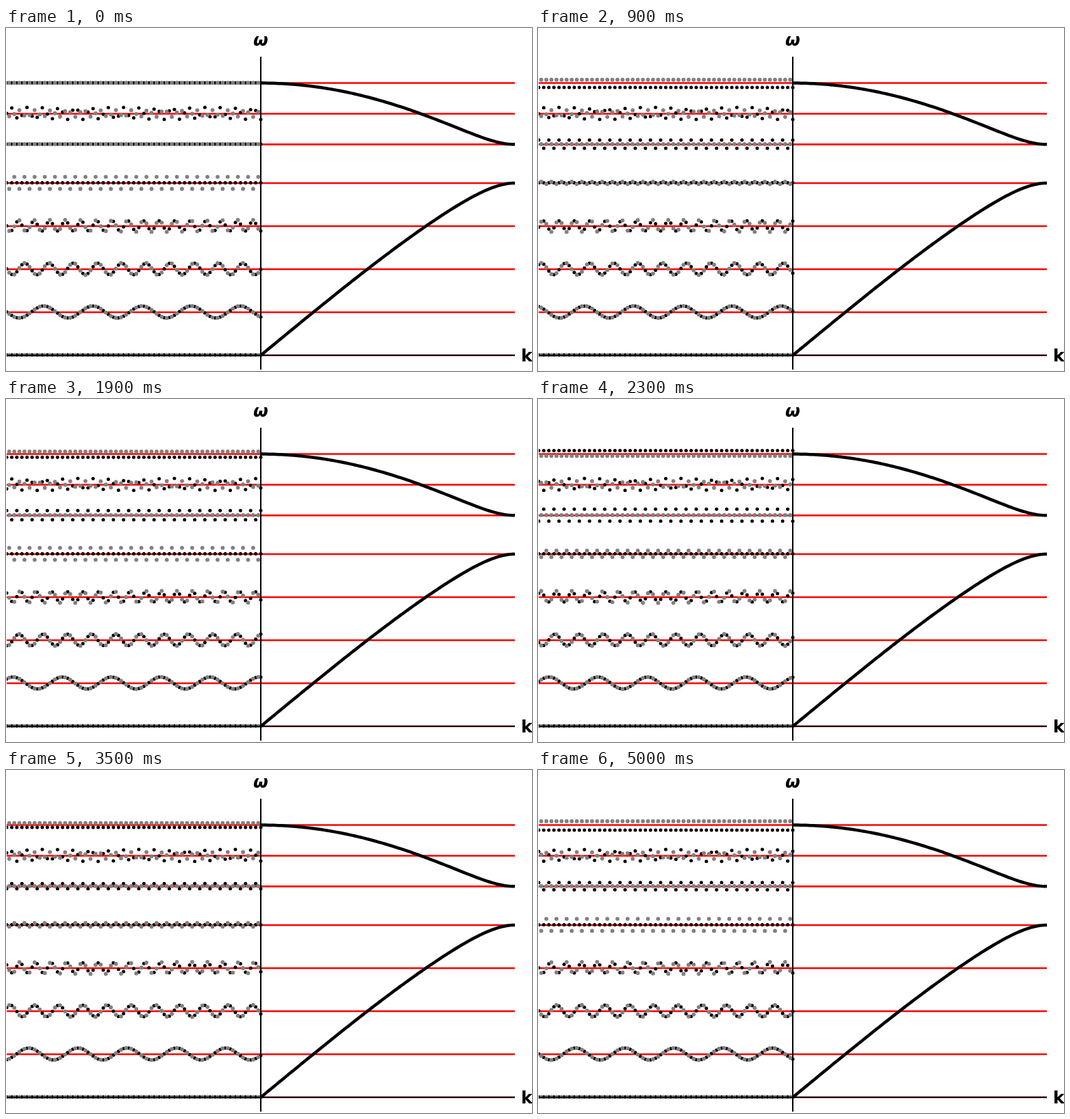
Write an HTML page with a canvas that moves like this. It is 768 px wide and 502 px high and loops after 5100 ms.

```html
<!DOCTYPE html>
<html lang="en">
<head>
<meta charset="utf-8">
<title>Phonon dispersion of a diatomic chain</title>
<style>
  html, body { margin: 0; width: 100%; height: 100%; overflow: hidden; background: #fff; }
  canvas { display: block; }
</style>
</head>
<body>
<canvas id="stage" width="768" height="502"></canvas>
<script>
const ctx = document.getElementById('stage').getContext('2d');
const LEFT = 1, AXIS = 372, RIGHT = 743, BASE = 479, SCALE = 63;
const CELLS = 50, SPACING = (AXIS - LEFT) / CELLS, AMPLITUDE = 8.8;
const STEP = 100, STEPS = 51, PERIOD = 50;

// Squared zone-edge frequencies of the heavy and the light sublattice
const HEAVY = 16, LIGHT = 24, MEAN = (HEAVY + LIGHT) / 2;
const TOP = Math.sqrt(HEAVY + LIGHT), EDGE = Math.sqrt(LIGHT);

const rowY = w => BASE - SCALE * w;

// branch: -1 acoustic, +1 optical; k in radians per cell
function frequency(k, branch) {
  const s = Math.sin(k / 2);
  return Math.sqrt(MEAN + branch * Math.sqrt(MEAN ** 2 - HEAVY * LIGHT * s * s));
}

function makeMode(w, branch) {
  const w2 = w * w;
  const s2 = (MEAN ** 2 - (w2 - MEAN) ** 2) / (HEAVY * LIGHT);
  const k = 2 * Math.asin(Math.sqrt(Math.min(1, Math.max(0, s2))));
  const c = Math.cos(k / 2);
  return branch < 0
    ? { w, k, heavy: AMPLITUDE, light: AMPLITUDE * LIGHT * c / (LIGHT - w2) }
    : { w, k, heavy: AMPLITUDE * HEAVY * c / (w2 - HEAVY), light: -AMPLITUDE };
}

const modes = [
  ...[0, 1, 2, 3, 4].map(w => makeMode(w, -1)),
  ...[EDGE, (EDGE + TOP) / 2, TOP].map(w => makeMode(w, 1))
];

function line(x1, y1, x2, y2, color, width) {
  ctx.strokeStyle = color;
  ctx.lineWidth = width;
  ctx.beginPath();
  ctx.moveTo(x1, y1);
  ctx.lineTo(x2, y2);
  ctx.stroke();
}

function drawAtoms({ w, k }, size, offset, count, radius, color, time) {
  ctx.fillStyle = color;
  for (let i = 0; i < count; i++) {
    const cell = i + offset;
    const y = rowY(w) - 0.4 + size * Math.sin(k * cell - w * time);
    ctx.beginPath();
    ctx.arc(LEFT + cell * SPACING, y, radius, 0, 2 * Math.PI);
    ctx.fill();
  }
}

function drawBranch(branch) {
  ctx.strokeStyle = '#000';
  ctx.lineWidth = 4.5;
  ctx.beginPath();
  for (let i = 0; i <= 100; i++) {
    const y = rowY(frequency(Math.PI * i / 100, branch));
    ctx.lineTo(AXIS + (RIGHT - AXIS) * i / 100, y);
  }
  ctx.stroke();
}

function draw(time) {
  ctx.fillStyle = '#fff';
  ctx.fillRect(0, 0, 768, 502);

  ctx.save();
  ctx.beginPath();
  ctx.rect(LEFT, 0, 768, 502);
  ctx.clip();
  for (const { w } of modes) line(LEFT, rowY(w), RIGHT, rowY(w), '#f00', 2.6);
  drawBranch(-1);
  drawBranch(1);
  for (const mode of modes) {
    drawAtoms(mode, mode.light, 0, CELLS + 1, 2.5, '#000', time);
    drawAtoms(mode, mode.heavy, 0.5, CELLS, 2.9, '#808080', time);
  }
  ctx.restore();

  line(LEFT, BASE, RIGHT, BASE, '#000', 2);
  line(AXIS, 42, AXIS, 500, '#000', 2);

  ctx.fillStyle = '#000';
  ctx.font = 'italic bold 25px "DejaVu Sans", sans-serif';
  ctx.fillText('ω', 361, 26);
  ctx.font = 'bold 25px "DejaVu Sans", sans-serif';
  ctx.fillText('k', 752, 488);
}

function tick() {
  const step = Math.floor(performance.now() / STEP) % STEPS;
  draw(2 * Math.PI * step / PERIOD);
  requestAnimationFrame(tick);
}
tick();
</script>
</body>
</html>
```
